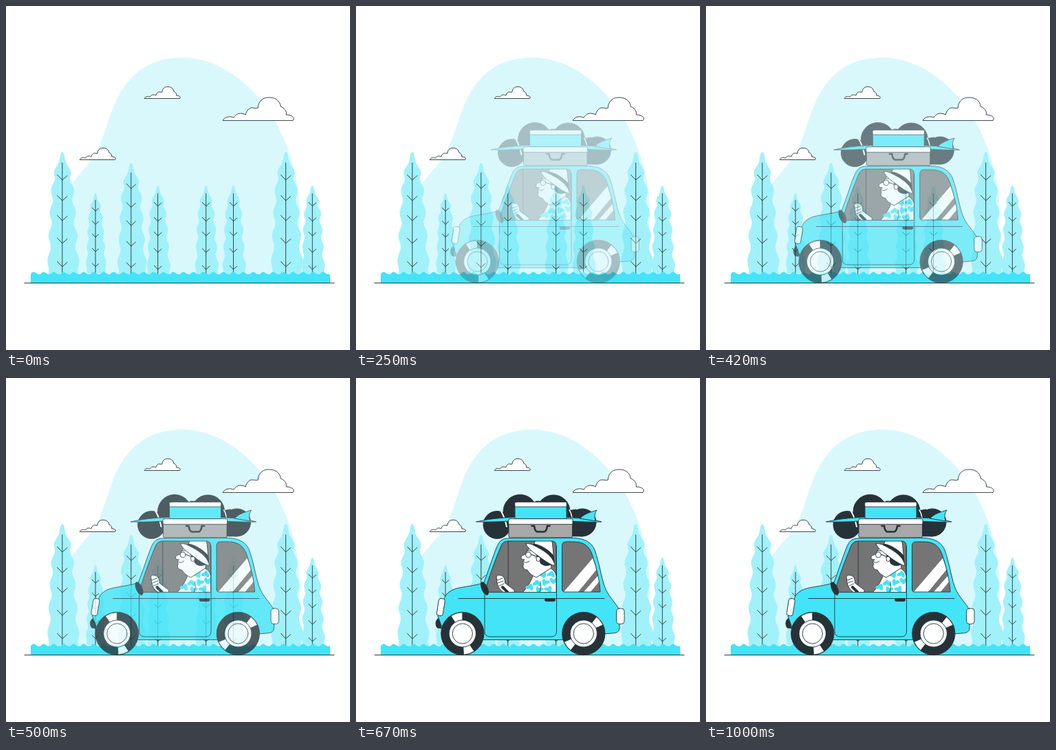
These frames come from a looping animation (500 px wide and 500 px high, 1040 ms). An HTML page with a canvas:

```html
<!DOCTYPE html>
<html lang="en">
<head>
<meta charset="utf-8">
<title>Road trip</title>
<style>
html, body { margin: 0; width: 100%; height: 100%; overflow: hidden; background: #fff; }
canvas { display: block; width: 500px; height: 500px; }
</style>
</head>
<body>
<canvas id="stage"></canvas>
<script>
const INK = '#263238', CYAN = '#43e4f7', LEAF = '#a1f1fb', SKY = '#d9f8fc';
const GLASS = '#757575', CASE = '#a8a8a8', WHITE = '#fff';
const LOOP = 1040, FPS = 24, STEPS = 25, SLIDE = 30;
const ratio = window.devicePixelRatio || 1;

function setup(canvas) {
  canvas.width = canvas.height = 500 * ratio;
  const ctx = canvas.getContext('2d');
  ctx.scale(ratio, ratio);
  ctx.lineJoin = ctx.lineCap = 'round';
  return ctx;
}
const stage = setup(document.getElementById('stage'));
const back = setup(document.createElement('canvas'));
const layer = setup(document.createElement('canvas'));

function shape(c, d, fill, stroke = INK, width = 0.9) {
  const path = typeof d === 'string' ? new Path2D(d) : d;
  if (fill) { c.fillStyle = fill; c.fill(path); }
  if (stroke) { c.strokeStyle = stroke; c.lineWidth = width; c.stroke(path); }
}
function line(c, d, width = 0.9, color = INK) { shape(c, d, null, color, width); }
function disc(c, x, y, r, fill, stroke = INK) {
  const p = new Path2D();
  p.arc(x, y, r, 0, Math.PI * 2);
  shape(c, p, fill, stroke);
}
function box(c, x, y, w, h, r, fill, stroke = INK) {
  const p = new Path2D();
  p.roundRect(x, y, w, h, r);
  shape(c, p, fill, stroke);
}

// Height from the tip and half width of the crown
const CROWN = [[0, 1], [4, 3], [15, 4.5], [22, 9], [30, 13.5], [40, 9.5], [52, 16.5],
  [60, 17], [71, 12.5], [84, 19], [92, 19], [104, 14.5], [118, 21], [126, 21],
  [139, 16.5], [154, 23], [162, 23], [172, 20], [182, 23]];

function tree(c, x, top, sx, sy) {
  const side = dir => CROWN.map(([y, w]) =>
    [x + dir * w * sx * (dir > 0 ? 1 + y / 2000 : 1 - y / 2500), top + y * sy]);
  const pts = [...side(-1), ...side(1).reverse()];
  const p = new Path2D();
  pts.forEach(([px, py], i) => {
    const [nx, ny] = pts[(i + 1) % pts.length];
    const mx = (px + nx) / 2, my = (py + ny) / 2;
    if (i) p.quadraticCurveTo(px, py, mx, my); else p.moveTo(mx, my);
  });
  p.quadraticCurveTo(...pts[0], x, top);
  shape(c, p, LEAF, null);

  line(c, `M${x},${top + 16 * sy}V390`);
  for (const y of [41, 71, 100, 133, 167]) {
    const v = top + y * sy, w = 7.2 * sx, h = 7.6 * sy;
    line(c, `M${x - w},${v - h}L${x},${v}L${x + w},${v - h * 0.85}`);
  }
}

const PUFF = 'M0,0C1,-2 4,-5 8,-5C11,-6 14,-4 16,-4C18,-8 22,-10 25,-10C29,-10 31,-9 33,-8' +
  'C34,-14 39,-19 43,-18C46,-18 48,-17 51,-18C51,-26 57,-33 65,-33C75,-34 83,-29 84,-20' +
  'C89,-18 93,-14 92,-8C97,-8 103,-6 103,-2L102,0Z';

function cloud(c, x, y, s) {
  c.save();
  c.translate(x, y);
  c.scale(s, s);
  shape(c, PUFF, WHITE, INK, 0.9 / s);
  c.restore();
}

function scenery(c) {
  c.fillStyle = WHITE;
  c.fillRect(0, 0, 500, 500);
  shape(c, 'M257,75C313,75 361,118 387,160C416,208 427,262 427,300C427,340 420,370 412,392' +
    'L86,392C74,350 74,295 94,262C108,240 127,226 136,203C151,168 154,135 181,106' +
    'C202,83 228,75 257,75Z', SKY, null);
  cloud(c, 201.3, 134.1, 0.505);
  cloud(c, 107.3, 223.1, 0.505);
  cloud(c, 315.3, 166.1, 1);

  tree(c, 81.8, 212, 1, 1);
  tree(c, 130, 272, 0.64, 0.64);
  tree(c, 181.8, 228, 0.91, 0.91);
  for (const x of [220.7, 290.7, 330.5, 445.3]) tree(c, x, 261, 0.74, 0.73);
  tree(c, 406.7, 212, 1, 1);

  let grass = 'M36,403V389.5';
  for (let i = 0; i < 30; i++) grass += 'q3.6,-5 7.25,-1.5q3.6,3.2 7.25,1.5';
  shape(c, grass + 'L471,403Z', CYAN, null);
  line(c, 'M27,402.7H477', 1);
}

function wheel(c, x, y, wedges) {
  disc(c, x, y, 31.2, INK);
  for (const [from, to] of wedges) {
    const a = from * Math.PI / 180, b = to * Math.PI / 180, p = new Path2D();
    p.arc(x, y, 30.8, a, b);
    p.arc(x, y, 19, b, a, true);
    p.closePath();
    shape(c, p, WHITE);
  }
  disc(c, x, y, 19.6, WHITE);
  disc(c, x, y, 14.6, WHITE);
}

function luggage(c) {
  disc(c, 238.5, 194, 24.5, INK);
  disc(c, 287, 194, 24, INK);
  shape(c, 'M262,179L290,180V205H240Z', INK);
  disc(c, 205, 213.5, 20, INK);
  disc(c, 329, 210, 20, INK);
  shape(c, 'M308,193L320,191L330,230H312Z', INK);
  line(c, 'M211,194Q216,202 219,216', 2, WHITE);
  line(c, 'M310,192Q313,196 314,204', 1.4, WHITE);

  shape(c, 'M175,209C195,204 222,202 250,202H295C322,203 343,205 357,209' +
    'C340,210 310,208 285,207H245C220,208 198,210 175,209Z', CYAN);
  shape(c, 'M326,204C332,197 341,195 350,192C346,198 347,203 348,207.5Z', CYAN);

  box(c, 222, 209, 92.5, 23, 2, CASE);
  box(c, 221.5, 204.7, 93.5, 8, 2, WHITE);
  line(c, 'M255.5,215H259Q260,223.5 264,223.5H273Q277,223.5 278,215H281.5', 2.6);
  box(c, 231, 184, 75, 20.5, 1, CYAN);
  box(c, 230.8, 180.2, 75.4, 7, 2, WHITE);
}

const FRONT_PANE = 'M187.5,311C190,298 201,268 210,246Q213,237 221,237H284Q291,237 291,244V311Z';
const REAR_PANE = 'M299.5,307V244Q299.5,238 305,238H316C332,238 339,245 343,256' +
  'C350,277 354,294 355,311H303Q299.5,311 299.5,307Z';

function driver(c) {
  // hand on the wheel
  shape(c, 'M204.5,292C203,288 206,285.5 209,287C213,286 217,291 216.5,298L230,308V312H215' +
    'C207,307 205,300 204.5,292Z', WHITE);
  line(c, 'M205,294L213,291M206,298L214,295M208,302L215,299', 0.8);
  line(c, 'M213,304L220,311', 4);

  // shirt
  shape(c, 'M242,312C248,305 254,297 257,288C262,283 270,280 282,276' +
    'Q292,281 292,294V312Z', WHITE);
  c.fillStyle = CYAN;
  const leaves = [[253, 304, 0.6], [263, 298, 0.2], [275, 297, 2.2], [272, 286, 1],
    [284, 285, 0.4], [287, 295, 1.6], [280, 307, 0.9], [266, 308, 2]];
  for (const [x, y, turn] of leaves) {
    for (const bend of [-0.7, 0.7]) {
      c.beginPath();
      c.ellipse(x + 2.4 * bend, y, 5, 2.6, turn + bend, 0, Math.PI * 2);
      c.fill();
    }
  }
  line(c, 'M267,311Q270,303 268,296', 0.8);

  // head and neck
  shape(c, 'M254,246C250,249 248,252 247,256C243,257 239,259 240,262C241,264 244,264 245,264' +
    'C242,267 242,269 244,270C241,274 244,279 249,279C252,284 256,287 262,290' +
    'L284,276L282,262L272,250Z', WHITE);
  shape(c, 'M262,257L267,264L268,269C272,273 278,274 283,271V261Z', INK);
  shape(c, 'M262,260Q267,258 268,263Q267,268 263,266Z', WHITE);
  line(c, 'M243,267Q248,270 252,266', 0.9);
  disc(c, 250.5, 257, 4, WHITE);
  line(c, 'M254.5,256.5L264,260', 1.1);
  line(c, 'M249,251L254,251', 1.1);

  // hat
  shape(c, 'M257,244L261,236H284Q286,239 286,246L288,267Z', WHITE);
  shape(c, 'M256,245L258.5,241C270,243 281,251 287,258L288,268Z', INK);
  shape(c, 'M247,241C252,239 260,244 269,249C279,255 288,263 289,273' +
    'C280,270 272,264 264,258C257,253 250,248 247,241Z', WHITE);
}

function car(c) {
  luggage(c);
  shape(c, 'M123,349C116,348 114,358 118,363L124,364Z', INK);
  shape(c, 'M186,297C192,282 198,262 204,247C208,237 212,233 222,233L317,232.5' +
    'C333,233 343,240 347,250C354,270 356,287 361,302C366,318 378,326 383,338V360' +
    'C384,368 380,371 372,371L350,373L304,380.5H182L140,375L124,360L119,346L128,322' +
    'C130,312 140,307 150,305C165,302 178,301 186,297Z', CYAN);

  shape(c, FRONT_PANE, GLASS, null);
  c.save();
  c.clip(new Path2D(FRONT_PANE));
  line(c, 'M221.2,237V311');
  driver(c);
  c.restore();
  line(c, FRONT_PANE);

  shape(c, REAR_PANE, GLASS, null);
  c.save();
  c.clip(new Path2D(REAR_PANE));
  shape(c, 'M301,312L344,262L350,278L322,312Z', WHITE, null);
  shape(c, 'M330,312L352,287L355,294L340,312Z', WHITE, null);
  c.restore();
  line(c, REAR_PANE);

  line(c, 'M187,311V368Q187,376 195,376H284Q291.5,376 291.5,368V244');
  line(c, 'M149,320.5H361');
  box(c, 274.5, 320.5, 15, 4, 2, INK);

  c.save();
  c.translate(187, 306);
  c.rotate(-0.42);
  c.fillStyle = INK;
  c.beginPath();
  c.ellipse(0, 0, 4.6, 10.5, 0, 0, Math.PI * 2);
  c.fill();
  c.restore();

  c.save();
  c.translate(123.3, 333);
  c.rotate(0.16);
  box(c, -4.5, -12.5, 9, 25, 3, WHITE);
  c.restore();
  box(c, 378.5, 335, 11.5, 22.5, 4, WHITE);

  wheel(c, 154.8, 371.5, [[-123, -90], [57, 87]]);
  wheel(c, 330.8, 371.5, [[-52, -24], [128, 157]]);
}

// cubic-bezier(.36, -.01, .5, 1.38)
function ease(p) {
  const curve = (s, a, b) => 3 * (1 - s) ** 2 * s * a + 3 * (1 - s) * s * s * b + s ** 3;
  let lo = 0, hi = 1;
  for (let i = 0; i < 30; i++) {
    const mid = (lo + hi) / 2;
    if (curve(mid, 0.36, 0.5) < p) lo = mid; else hi = mid;
  }
  return curve(hi, -0.01, 1.38);
}

function draw(ms) {
  const step = Math.min(STEPS - 1, Math.floor((ms + 5.001) * FPS / 1000));
  const k = step < 2 ? 0 : ease((step + 1) / STEPS);
  stage.drawImage(back.canvas, 0, 0, 500, 500);
  if (k <= 0) return;
  layer.clearRect(0, 0, 500, 500);
  layer.save();
  layer.translate(SLIDE * (1 - k), 0);
  car(layer);
  layer.restore();
  stage.globalAlpha = Math.min(1, k);
  stage.drawImage(layer.canvas, 0, 0, 500, 500);
  stage.globalAlpha = 1;
}

scenery(back);
const start = performance.now();
function tick() {
  draw((performance.now() - start) % LOOP);
  requestAnimationFrame(tick);
}
tick();
</script>
</body>
</html>
```
